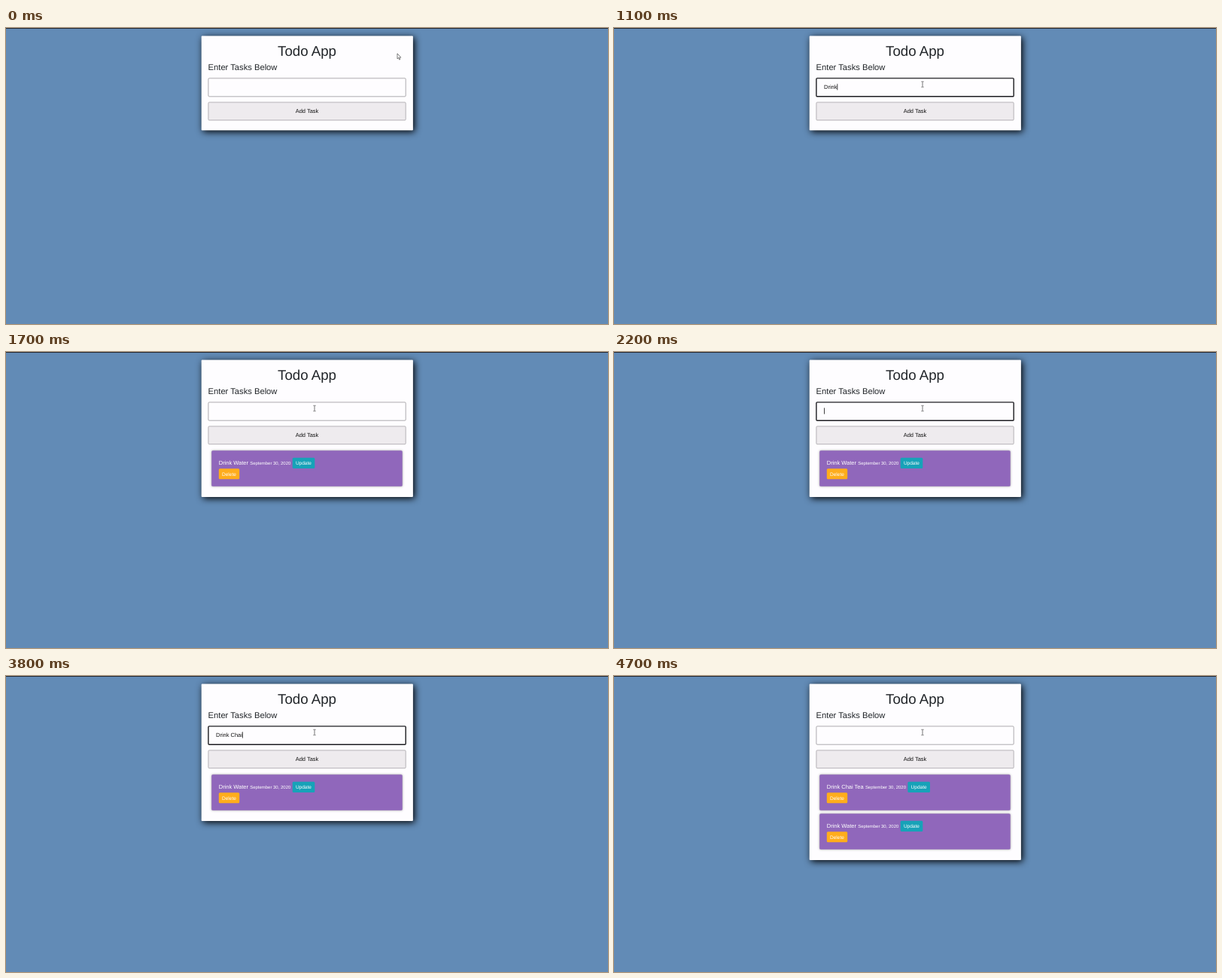
An HTML page that plays this animation: 800 by 394 pixels, repeating every 5 s.

```html
<!DOCTYPE html>
<html lang="en">
<head>
<meta charset="utf-8">
<title>Todo App</title>
<style>
  html, body { margin: 0; width: 100%; height: 100%; overflow: hidden; background: #628bb6; }
  svg { display: block; font-family: "Liberation Sans", Arial, sans-serif; text-rendering: geometricPrecision; }
  text { white-space: pre; font-size: 7.47px; fill: #212529; }
  #card { fill: #fefdff; filter: drop-shadow(2.5px 2.5px 5px #000); }
  .task text { fill: #fff; }
  .task .small { font-size: 5.97px; }
  .task .label { font-size: 6.53px; }
  .panel { fill: #9067bb; filter: drop-shadow(0 0 1.5px #0006); }
</style>
</head>
<body>
<svg width="800" height="394" viewBox="0 0 800 394">
  <rect width="800" height="1" fill="#25282f"/>
  <rect id="card" x="259.7" y="10.5" width="281.2" height="125.7" rx="1"/>
  <text x="400" y="37.3" text-anchor="middle" style="font-size:18.67px">Todo App</text>
  <text x="268.6" y="56.2" style="font-size:11.2px">Enter Tasks Below</text>
  <rect id="field" x="268.9" y="66.9" width="262.3" height="24.3" rx="1.2" fill="#fefdff"/>
  <text id="typed" x="279" y="81.1" style="fill:#111"></text>
  <path id="squiggle" d="M298.5 82.3 q.65 -1.1 1.3 0 t1.3 0 1.3 0 1.3 0 1.3 0 1.3 0 1.3 0 1.3 0 1.3 0 1.3 0 1.3 0 1.3 0" fill="none" stroke="#e0403c" stroke-width=".6"/>
  <rect id="caret" y="74.4" width=".8" height="8.2" fill="#111"/>
  <rect x="268.9" y="98.9" width="262.3" height="23.8" rx="1.2" fill="#eeebee" stroke="#a5a3a6" stroke-width=".8"/>
  <text x="400" y="113" text-anchor="middle" style="fill:#111">Add Task</text>
  <g id="tasks"></g>
  <path id="arrow" d="M0 0 V7 L1.6 5.6 L2.7 8.2 L3.8 7.7 L2.7 5.2 H4.8 Z" fill="#fff" stroke="#444" stroke-width=".7"/>
  <path id="beam" d="M-1.6 -3.7 H-.5 L0 -3.3 L.5 -3.7 H1.6 M0 -3.3 V3.3 M-1.6 3.7 H-.5 L0 3.3 L.5 3.7 H1.6" fill="none" stroke="#555" stroke-width=".8"/>
</svg>
<script>
const $ = id => document.getElementById(id);
const LOOP = 5000, STEP = 100, ROW = 52;

// Characters visible at each step, counted from the start time
const entries = [
  { text: "Drink Water", focus: 500, start: 800, counts: [1, 3, 4, 5, 6, 7, 8, 9, 11], sent: 1700 },
  { text: "Drink Chai Tea", focus: 2000, start: 2300,
    counts: [1, 2, 3, 4, 5, 6, 6, 6, 6, 6, 6, 6, 7, 8, 9, 10, 11, 11, 12, 13, 14], sent: 4600 }
];

const show = (id, on) => $(id).setAttribute("visibility", on ? "visible" : "hidden");
const place = (id, x, y) => $(id).setAttribute("transform", `translate(${x} ${y})`);

function taskMarkup(title, row, shift) {
  return `<g class="task" transform="translate(0 ${row * ROW})">
    <rect class="panel" x="273.2" y="131.2" width="253.5" height="47.6" rx="1.5"/>
    <text x="282.8" y="150.1">${title}</text>
    <text class="small" x="${324.2 + shift}" y="150.1">September 30, 2020</text>
    <rect x="${380.7 + shift}" y="140.7" width="29.6" height="14.4" rx="1.5" fill="#17a2b8"/>
    <text class="label" x="${384.9 + shift}" y="150.1">Update</text>
    <rect x="282.8" y="155.2" width="27.4" height="14" rx="1.5" fill="#ffad1c"/>
    <text class="label" x="287" y="164.5">Delete</text>
  </g>`;
}

let shown = -1;
function drawTasks(count) {
  if (count === shown) return;
  shown = count;
  $("tasks").innerHTML = entries.slice(0, count).reverse()
    .map((e, row) => taskMarkup(e.text, row, e === entries[1] ? 9.7 : 0)).join("");
  $("card").setAttribute("height", count ? 130.4 + ROW * count : 125.7);
}

function drawField(t) {
  const entry = entries.find(e => t >= e.focus && t < e.sent);
  let text = "";
  if (entry && t >= entry.start) {
    const i = Math.min((t - entry.start) / STEP, entry.counts.length - 1);
    text = entry.text.slice(0, entry.counts[i]);
  }
  $("typed").textContent = text;
  const width = text ? $("typed").getComputedTextLength() : 0;
  $("caret").setAttribute("x", 279 + width);
  show("caret", entry && !(t >= 3200 && t < 3500));
  show("squiggle", text.startsWith("Drink Chai "));
  $("field").setAttribute("stroke", entry ? "#1c1c20" : "#98969a");
  $("field").setAttribute("stroke-width", entry ? 1.4 : .8);
}

function drawPointer(t) {
  const p = Math.min(t / 400, 1), k = p * p * (3 - 2 * p);
  const x = 520 - 110 * k, y = 34 + 41 * k, over = y > 66;
  place("arrow", x, y);
  place("beam", x, y);
  show("arrow", !over);
  show("beam", over);
}

function frame(now) {
  const t = Math.floor(now % LOOP / STEP) * STEP;
  drawTasks(entries.filter(e => t >= e.sent).length);
  drawField(t);
  drawPointer(t);
  requestAnimationFrame(frame);
}
frame(0);
</script>
</body>
</html>
```
